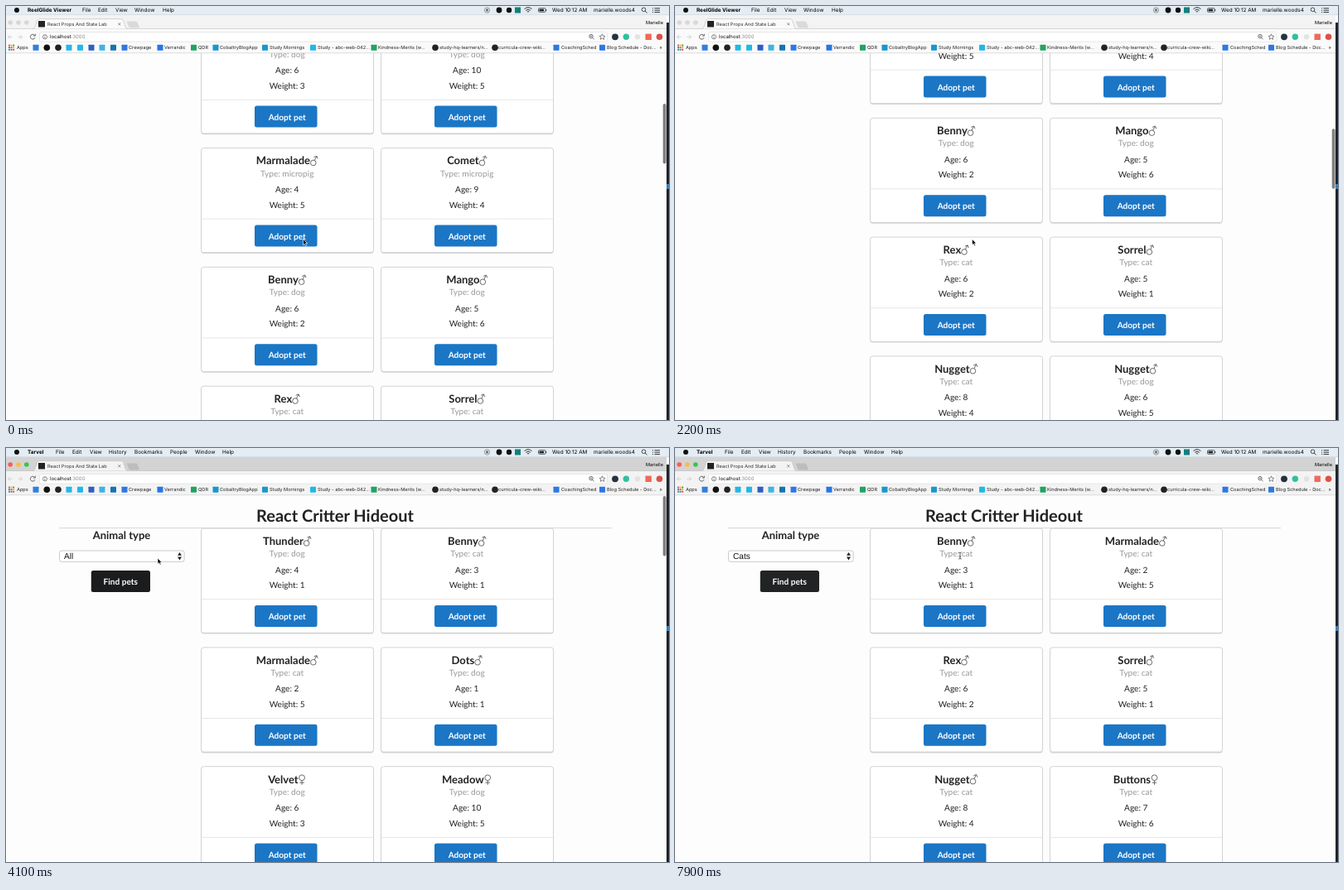
Animation of 800 by 500 pixels, one loop 8000 ms. Source, as an HTML page:

```html
<!DOCTYPE html>
<html lang="en">
<head>
<meta charset="utf-8">
<title>Pet adoption demo</title>
<style>
  html, body { margin: 0; width: 100%; height: 100%; overflow: hidden; background: #fdfdfd; }
  svg { display: block; width: 800px; height: 500px; font-family: Inter, Roboto, sans-serif; text-rendering: geometricPrecision;
    --strip: #f3f3f3; --bar: #fafafa; --red: #d8d8d8; --yellow: #d8d8d8; --green: #d8d8d8; }
  svg.active { --strip: #d3d3d3; --bar: #f3f3f3; --red: #fc5b57; --yellow: #fdbd3e; --green: #34c84a; }
  .page { font-family: Lato, sans-serif; fill: #222; }
  .mid { text-anchor: middle; }
  .bold { font-weight: 700; }
  .form { font-family: "Liberation Sans", sans-serif; }
</style>
</head>
<body>
<svg id="stage" viewBox="0 0 800 500"></svg>
<script>
const LOOP = 8000, STEP = 100;
const PAGE_TOP = 57, PAGE_WIDTH = 797, CARD_TOP = 97, ROW = 143.8;
const CARD_MIDDLE = 339.2, SYMBOL_WIDTH = 9.6;

// name, sex, type, age, weight
const pets = [
  ['Thunder', 'male', 'dog', 4, 1], ['Benny', 'male', 'cat', 3, 1],
  ['Marmalade', 'male', 'cat', 2, 5], ['Dots', 'male', 'dog', 1, 1],
  ['Velvet', 'female', 'dog', 6, 3], ['Meadow', 'female', 'dog', 10, 5],
  ['Marmalade', 'male', 'micropig', 4, 5], ['Comet', 'male', 'micropig', 9, 4],
  ['Benny', 'male', 'dog', 6, 2], ['Mango', 'male', 'dog', 5, 6],
  ['Rex', 'male', 'cat', 6, 2], ['Sorrel', 'male', 'cat', 5, 1],
  ['Nugget', 'male', 'cat', 8, 4], ['Nugget', 'male', 'dog', 6, 5],
  ['Buttons', 'female', 'cat', 7, 6]
];

const symbols = {
  male: 'M.5-2A3.3 3.3 0 1 0 7.1-2A3.3 3.3 0 1 0 .5-2M5.2-4.9L7.8-10M4.6-8.8L7.9-10.2L9.2-7',
  female: 'M1-6.4A3.4 3.4 0 1 0 7.8-6.4A3.4 3.4 0 1 0 1-6.4M4.4-3V2.2M1.6-.5H7.2'
};

const text = (x, y, size, str, attrs = '') => `<text x="${x}" y="${y}" font-size="${size}" ${attrs}>${str}</text>`;
const rect = (x, y, w, h, fill, attrs = '') => `<rect x="${x}" y="${y}" width="${w}" height="${h}" fill="${fill}" ${attrs}/>`;
const dot = (x, y, r, fill, attrs = '') => `<circle cx="${x}" cy="${y}" r="${r}" fill="${fill}" ${attrs}/>`;
const line = (d, color, width = 1, attrs = '') => `<path d="${d}" fill="none" stroke="${color}" stroke-width="${width}" ${attrs}/>`;
const group = (id, content, attrs = '') => `<g id="${id}" ${attrs}>${content}</g>`;

function card([name, sex, type, age, weight], i) {
  const x = i % 2 * 217;
  const y = CARD_TOP + Math.floor(i / 2) * ROW;
  const label = (dy, size, str, attrs = 'class="mid"') => text(CARD_MIDDLE, dy, size, str, attrs);
  return `<g transform="translate(${x} ${y})">
    ${rect(235.5, 1, 208, 126.6, '#d2d3d4', 'rx="3"')}
    ${rect(235.5, .1, 208, 126.2, '#fff', 'rx="3" stroke="#d2d3d4"')}
    ${text(CARD_MIDDLE - SYMBOL_WIDTH / 2, 20, 13, name, 'class="mid bold name"')}
    ${line(symbols[sex], '#5a5a5a', .9)}
    ${label(34.3, 10.1, 'Type: ' + type, 'class="mid" fill="#999"')}
    ${label(53.5, 10.1, 'Age: ' + age)}
    ${label(72.2, 10.1, 'Weight: ' + weight)}
    ${line('M236 85.7H443', '#e6e6e7')}
    ${rect(300, 93, 75.5, 26, '#1b76c6', 'rx="2.5"')}
    ${label(110.2, 10.1, 'Adopt pet', 'class="mid bold" fill="#fff"')}
  </g>`;
}

const cards = list => list.map(card).join('');

// Sets each sex symbol right after its name.
function placeSymbols() {
  for (const name of document.querySelectorAll('.name')) {
    const x = CARD_MIDDLE + (name.getComputedTextLength() - SYMBOL_WIDTH) / 2;
    name.nextElementSibling.setAttribute('transform', `translate(${x} 20)`);
  }
}

function menu(id, app, items) {
  return group(id, text(26, 7.4, 6.4, app, 'class="bold"') +
    items.map(([x, name]) => text(x, 7.4, 6.4, name)).join(''));
}

function menuBar() {
  return rect(0, 0, 800, 11, '#e4edf3') + line('M0 10.7H800', '#cbd2d7', .6) + dot(13, 5, 3, '#111') +
    menu('viewerMenu', 'ReelGlide Viewer',
      [[92, 'File'], [111, 'Edit'], [132, 'View'], [155, 'Window'], [189, 'Help']]) +
    menu('browserMenu', 'Tarvel', [[60, 'File'], [80, 'Edit'], [101, 'View'], [124, 'History'],
      [155, 'Bookmarks'], [198, 'People'], [228, 'Window'], [261, 'Help']]) +
    dot(580.5, 5, 3.2, 'none', 'stroke="#777" stroke-width=".7"') + rect(579, 3.5, 3, 3, '#777') +
    dot(595, 5, 3.4, '#111') + dot(607, 5, 3.2, '#111') + rect(614, 1.5, 7, 7, '#12807c') +
    line('M625.5 3.6Q630 -.2 634.5 3.6M627.2 5.3Q630 3 632.8 5.3M628.8 7Q630 6 631.2 7', '#222', .9) +
    rect(642.5, 2.7, 8.5, 4.6, 'none', 'rx="1" stroke="#222" stroke-width=".7"') +
    rect(643.5, 3.7, 5.5, 2.6, '#222') + rect(651.4, 4, .8, 2, '#222') +
    text(659, 7.4, 6.4, 'Wed 10:12 AM') + text(709, 7.4, 6.4, 'marielle.woods4') +
    dot(769.5, 4.3, 2.3, 'none', 'stroke="#222" stroke-width=".8"') + line('M771.2 6L773.5 8.4', '#222', .9) +
    line('M780 2.8h1M782.5 2.8H789M780 5.2h1M782.5 5.2H789M780 7.6h1M782.5 7.6H789', '#222', .9);
}

function tabStrip() {
  return rect(0, 11, PAGE_WIDTH, 17, 'var(--strip)') + line(`M0 27.5H${PAGE_WIDTH}`, '#c4c4c4', .6) +
    ['red', 'yellow', 'green'].map((name, i) => dot(5.2 + i * 9.8, 20, 2.8, `var(--${name})`)).join('') +
    `<path d="M32 28Q34 27.5 35 25L37.5 17.5Q38.3 15.6 40 15.6H139Q141 15.6 141.7 17.5L144 25Q145 27.5 147 28Z" fill="var(--bar)" stroke="#bbb" stroke-width=".6"/>` +
    `<path d="M145.5 18.5H157Q158 18.5 158.4 19.5L161 25.5Q161.2 26.5 160 26.5H150Q148.6 26.5 148 25Z" fill="#000" opacity=".1"/>` +
    rect(39, 18, 8, 7.5, '#222') + text(50, 24, 5.7, 'React Props And State Lab', 'fill="#333"') +
    line('M135.3 20.3l3 3m0-3l-3 3', '#666', .7) + text(772, 22.3, 5.6, 'Marielle');
}

function toolBar() {
  return rect(0, 28, PAGE_WIDTH, 29, 'var(--bar)') +
    line('M7.5 37.3H2.5M5 34.8L2.5 37.3L5 39.8M14.5 37.3h5M17 34.8l2.5 2.5L17 39.8', '#d0d0d0', .9) +
    line('M34.7 35.6A2.9 2.9 0 1 0 35 38.2M35.3 33.7V36H33', '#555', .9) +
    rect(40.5, 31.5, 685, 11.6, '#fff', 'rx="2" stroke="#dadada" stroke-width=".6"') +
    dot(47, 37.3, 2.6, 'none', 'stroke="#555" stroke-width=".7"') + line('M47 36.8V38.8M47 35.4V36', '#555', .8) +
    text(53, 39.3, 6, 'localhost<tspan fill="#888">:3000</tspan>') +
    dot(706, 36.6, 2.2, 'none', 'stroke="#444" stroke-width=".8"') + line('M707.6 38.3L709.6 40.3M705 36.6h2', '#444', .8) +
    `<path d="M719.5 33.8l1 2.3 2.5.2-1.9 1.6.6 2.5-2.2-1.4-2.2 1.4.6-2.5-1.9-1.6 2.5-.2Z" fill="none" stroke="#555" stroke-width=".7"/>` +
    dot(735, 37.3, 3.9, '#24313f') + dot(748.3, 37.3, 3.7, '#2fc0a0') + dot(762, 37.3, 3.2, '#e3e3e3') +
    rect(771.5, 33.6, 7.4, 7.4, '#ef6a5a') + dot(788.5, 37.3, 3.8, '#dc5147');
}

function bookmarks() {
  const round = [[49.3, '#111'], [63, '#222'], [518, '#222'], [590, '#222']];
  const square = [[36, '#2f7fe0'], [76, '#20b8e8'], [89.5, '#20b8e8'], [103, '#2d5fc4'], [116, '#3bb4e6'],
    [129.5, '#1574b3'], [143, '#2d78e4'], [186, '#2476e8'], [226.5, '#1fa463'], [253, '#1798d0'],
    [312.5, '#1798d0'], [370.5, '#20b8e8'], [444, '#1fa463'], [664, '#2d78e4'], [719.5, '#2d78e4']];
  const labels = [[13, 'Apps'], [148, 'Crewpage'], [191, 'Verrandic'], [232, 'QDR'], [258, 'CobaltryBlogApp'],
    [318, 'Study Mornings'], [376, 'Study - abc-web-042...'], [449, 'Kindness-Merits (w...'],
    [523, 'study-hq-learners/n...'], [594, 'curricula-crew-wiki...'], [670, 'CoachingSched'],
    [725, 'Blog Schedule - Doc...'], [788.5, '»']];
  const grid = ['#e94b3c', '#f4b400', '#1fa463', '#2d78e4'];
  let out = '';
  for (let i = 0; i < 9; i++) out += rect(3 + i % 3 * 2.6, 46.6 + Math.floor(i / 3) * 2.6, 1.9, 1.9, grid[i % 4]);
  out += round.map(([x, color]) => dot(x, 50.2, 3.8, color)).join('');
  out += square.map(([x, color]) => rect(x - 3.5, 46.7, 7, 7, color, 'rx=".6"')).join('');
  out += labels.map(([x, str]) => text(x, 52.3, 5.65, str, 'fill="#222"')).join('');
  return out + line(`M0 56.8H${PAGE_WIDTH}`, '#c8c8c8', .6);
}

function page() {
  return group('content',
    text(397, 88.6, 20, 'React Critter Hideout', 'class="mid bold"') +
    group('allCards', cards(pets)) +
    group('catCards', cards(pets.filter(pet => pet[2] === 'cat'))) +
    line('M64 96.7H731', '#d6d6d6') +
    text(139.5, 109.6, 13, 'Animal type', 'class="mid bold"') +
    rect(63.6, 123.4, 152.4, 14.6, 'none', 'id="focusRing" rx="3" stroke="#4f9bea" stroke-width="2.2"') +
    rect(64.5, 124, 150.6, 13.3, '#fff', 'rx="2.5" stroke="#bdbdbd" stroke-width=".8"') +
    text(70, 134.1, 10.1, 'All', 'id="choice" class="form" fill="#111"') +
    '<path d="M207 129.8L209.5 126L212 129.8ZM207 131.6L209.5 135.4L212 131.6Z" fill="#222"/>' +
    rect(102.8, 148, 71.2, 26, '#1b1c1d', 'id="findButton" rx="2.5"') +
    text(138.3, 165, 10.1, 'Find pets', 'class="mid bold" fill="#fff"') +
    group('popup',
      rect(58, 121, 160, 56, '#f5f5f5', 'rx="3" stroke="#bbb" stroke-width=".6"') +
      rect(58, 123, 160, 13, '#3b83f6', 'id="highlight"') +
      ['All', 'Cats', 'Dogs', 'Micropigs'].map((str, i) =>
        text(70, 133.2 + i * 13, 10.1, str, 'class="form option"')).join('') +
      line('M61.5 129.8l2 2.2l3.5-5', '#555', 1)));
}

function cursors() {
  const edge = 'stroke="#fff" stroke-width=".7" stroke-linejoin="round"';
  return group('arrow', `<path d="M0 0V7.2L1.7 5.7L2.9 8.3L4.1 7.8L3 5.2H5.2Z" fill="#000" ${edge}/>`) +
    group('hand', `<path d="M-.8 0Q0-.8.6 0V3L3.2 3.6Q4 4 3.8 5L3.2 8H-.7L-3 4.8Q-2.5 3.6-1 5Z" fill="#fff" stroke="#111" stroke-width=".7"/>`) +
    group('beam', line('M-1.8-4Q0-4 0-3V3Q0 4-1.8 4M1.8-4Q0-4 0-3M1.8 4Q0 4 0 3M-1 1H1', '#333', .8));
}

const stage = document.getElementById('stage');
stage.innerHTML = `<clipPath id="view"><rect y="${PAGE_TOP}" width="${PAGE_WIDTH}" height="443"/></clipPath>` +
  rect(0, 0, 800, 500, '#fdfdfd') +
  `<g class="page" clip-path="url(#view)">${page()}</g>` +
  rect(792.7, 58, 3.8, 72.5, '#808080', 'id="thumb" rx="1.9"') +
  rect(PAGE_WIDTH, 20, 3, 480, '#20242a') + rect(PAGE_WIDTH, 215, 3, 6, '#3b7fb5') +
  menuBar() + tabStrip() + toolBar() + bookmarks() + cursors();
placeSymbols();

const el = id => document.getElementById(id);
const show = (id, on) => el(id).style.display = on ? '' : 'none';
const options = [...document.querySelectorAll('.option')];

// Linear interpolation through [time, value] points.
function track(points, t) {
  const next = points.findIndex(p => p[0] > t);
  if (next === 0) return points[0][1];
  if (next < 0) return points[points.length - 1][1];
  const [t0, a] = points[next - 1], [t1, b] = points[next];
  return a + (b - a) * (t - t0) / (t1 - t0);
}

const scroll = [[0, 357], [300, 365], [400, 365], [500, 390], [700, 443], [900, 478], [1100, 501], [1400, 521],
  [1800, 533], [2200, 537], [2300, 515], [2500, 320], [2700, 120], [2900, -9], [3100, -6], [3400, 0]];
const pointerX = [[3200, 358.5], [3600, 270], [4000, 183], [4700, 183], [5300, 150], [5600, 150], [6100, 156],
  [7000, 156], [7400, 250], [7800, 344]];
const pointerY = [[3200, 281.5], [3600, 195], [4000, 133], [4700, 133], [5300, 144], [5600, 144], [6100, 161],
  [7000, 161], [7400, 143], [7800, 130]];

function draw(t) {
  const offset = track(scroll, t), x = track(pointerX, t), y = track(pointerY, t);
  const active = t >= 4100, chosen = t >= 5600, filtered = t >= 6900;

  stage.classList.toggle('active', active);
  show('viewerMenu', !active);
  show('browserMenu', active);

  el('content').setAttribute('transform', `translate(0 ${-offset})`);
  el('thumb').setAttribute('y', 58 + (offset > 0 ? offset * .168 : 0));
  el('thumb').setAttribute('opacity', track([[4200, 1], [4600, 0]], t));

  show('allCards', !filtered);
  show('catCards', filtered);
  el('choice').textContent = chosen ? 'Cats' : 'All';
  show('focusRing', t >= 4600 && !filtered);

  const picked = y > 137 ? 1 : 0;
  show('popup', t >= 4600 && !chosen);
  el('highlight').setAttribute('y', 123 + picked * 13);
  options.forEach((option, i) => option.setAttribute('fill', i === picked ? '#fff' : '#222'));

  const overButton = x > 103 && x < 174 && y > 148 && y < 174;
  el('findButton').setAttribute('fill', overButton ? '#27292a' : filtered ? '#222324' : '#1b1c1d');

  const kind = overButton ? 'hand' : t >= 7600 ? 'beam' : 'arrow';
  for (const id of ['arrow', 'hand', 'beam']) {
    show(id, id === kind);
    el(id).setAttribute('transform', `translate(${x} ${y})`);
  }
}

function tick() {
  draw(Math.floor(performance.now() % LOOP / STEP) * STEP);
  requestAnimationFrame(tick);
}
tick();
</script>
</body>
</html>
```
